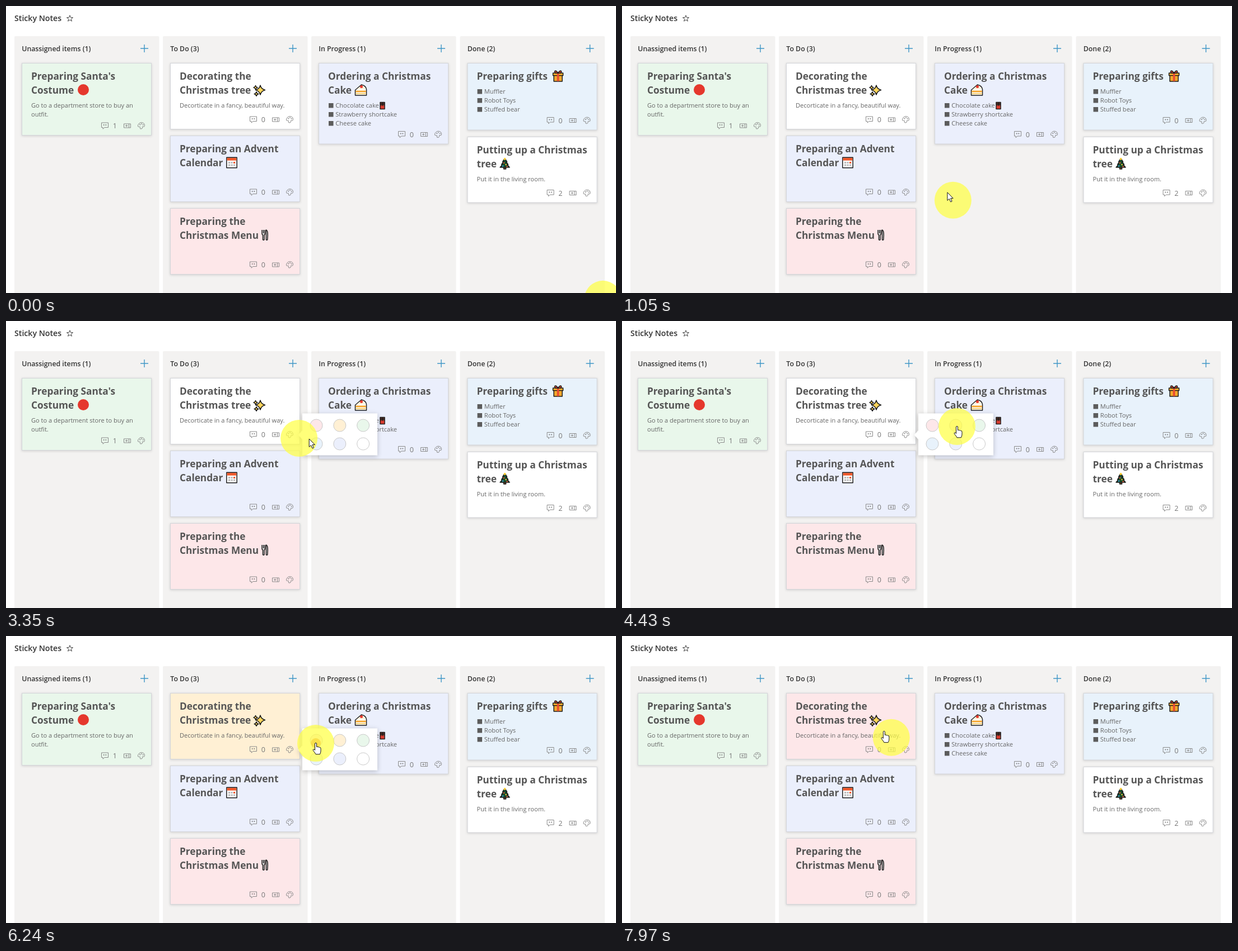
An HTML page for the animation above (8 s loop, 1089 px wide and 514 px high).

```html
<!DOCTYPE html>
<html lang="en">
<head>
<meta charset="utf-8">
<title>Sticky Notes</title>
<style>
  html, body { margin: 0; width: 100%; height: 100%; overflow: hidden; background: #fff; }
  svg { display: block; width: 100vw; height: 100vh; }
  text { font: 400 11.05px "Open Sans", "Noto Sans", sans-serif; fill: #666; white-space: pre; }
  .page { font-size: 14.2px; font-weight: 600; fill: #333; }
  .column { font-size: 12.3px; font-weight: 600; fill: #333; }
  .title { font-size: 17.25px; font-weight: 700; fill: #555; }
  .count { font-size: 12.5px; fill: #777; }
  .card { stroke: #d3d5d9; filter: drop-shadow(0 1.5px 2px rgba(0, 0, 0, .14)); }
  .icon { fill: none; stroke: #8a8a8a; }
  .plus { fill: none; stroke: #3f97c6; stroke-width: 1.4; }
  .emoji { stroke: #1d1d1d; stroke-width: 1.5; stroke-linejoin: round; }
  .flat { stroke: none; }
  .pointer { fill: #fff; stroke: #111; stroke-linejoin: round; }
  #popup { filter: drop-shadow(0 2px 4px rgba(0, 0, 0, .22)); }
</style>
</head>
<body>
<svg id="stage" viewBox="0 0 1089 514"></svg>
<script>
const COLORS = {
  pink: '#fde7e9', yellow: '#fff0d4', green: '#e9f7eb',
  blue: '#e8f2fb', lavender: '#ebeffc', white: '#ffffff'
};
const LOOP = 8000;
const CARD_WIDTH = 231;

const columns = [
  { x: 15, name: 'Unassigned items (1)', cards: [
    { y: 102.5, h: 129, color: 'green', title: ["Preparing Santa's", 'Costume'],
      body: ['Go to a department store to buy an', 'outfit.'], count: 1, emoji: ['santa', 138, 150] }
  ] },
  { x: 280, name: 'To Do (3)', cards: [
    { y: 102.5, h: 118, color: 'white', title: ['Decorating the', 'Christmas tree'],
      body: ['Decorticate in a fancy, beautiful way.'], count: 0, emoji: ['sparkles', 452, 151] },
    { y: 232.5, h: 118, color: 'lavender', title: ['Preparing an Advent', 'Calendar'],
      body: [], count: 0, emoji: ['calendar', 403, 280.5] },
    { y: 362.5, h: 118, color: 'pink', title: ['Preparing the', 'Christmas Menu'],
      body: [], count: 0, emoji: ['cutlery', 462, 410] }
  ] },
  { x: 545, name: 'In Progress (1)', cards: [
    { y: 102.5, h: 144.5, color: 'lavender', title: ['Ordering a Christmas', 'Cake'], list: true,
      body: ['Chocolate cake', 'Strawberry shortcake', 'Cheese cake'], count: 0, emoji: ['cake', 633.5, 150.5] }
  ] },
  { x: 810.5, name: 'Done (2)', cards: [
    { y: 102.5, h: 119.5, color: 'blue', title: ['Preparing gifts'], list: true,
      body: ['Muffler', 'Robot Toys', 'Stuffed bear'], count: 0, emoji: ['gift', 985.5, 125] },
    { y: 234.5, h: 117.5, color: 'white', title: ['Putting up a Christmas', 'tree'],
      body: ['Put it in the living room.'], count: 2, emoji: ['tree', 890.5, 282] }
  ] }
];

const swatches = Object.values(COLORS);
['pink', 'yellow', 'green', 'blue', 'lavender', 'white'].forEach((name, i) => swatches[i] = {
  x: 554 + i % 3 * 41.8, y: i < 3 ? 187 : 220, color: COLORS[name]
});

const text = (x, y, content, cls = '') => `<text x="${x}" y="${y}" class="${cls}">${content}</text>`;
const rect = (x, y, w, h, fill, cls = 'flat') =>
  `<rect x="${x}" y="${y}" width="${w}" height="${h}" fill="${fill}" class="${cls}"/>`;
const dot = (x, y, r, fill, cls = 'flat') => `<circle cx="${x}" cy="${y}" r="${r}" fill="${fill}" class="${cls}"/>`;
const path = (d, fill = 'none', cls = '') => `<path d="${d}" fill="${fill}" class="${cls}"/>`;
const at = (x, y, content, cls = '') => `<g transform="translate(${x} ${y})" class="${cls}">${content}</g>`;
const spark = (x, y, r) =>
  path(`M${x} ${y - r}Q${x + r * .2} ${y - r * .2} ${x + r} ${y}Q${x + r * .2} ${y + r * .2} ${x} ${y + r}` +
       `Q${x - r * .2} ${y + r * .2} ${x - r} ${y}Q${x - r * .2} ${y - r * .2} ${x} ${y - r}Z`, '#ffd45a');

const emoji = {
  santa: dot(0, 0, 10, '#e5382d'),
  sparkles: spark(2, -.5, 8.5) + spark(-6.5, -5, 3.5) + spark(-5, 6.5, 3.8),
  calendar: rect(-9.2, -9.2, 18.4, 18.4, '#fff', '') + rect(-8.4, -8.4, 16.8, 4.6, '#f0592b') +
    [0, 1, 2, 3, 4, 5].map(i => rect(-6 + i % 3 * 4.5, i < 3 ? -1.5 : 3, 3.2, 3, i == 2 ? '#f0592b' : '#bbb')).join(''),
  cutlery: path('M-5-9V-3Q-5 0-3.5 0V8.5Q-2.2 10-1 8.5V0Q.4 0 .4-3V-9M-2.3-9V-3', '#ddd') +
    path('M2.4-9Q5.5-8 5.3 1L4.8 8.5Q3.6 10 2.5 8.5Z', '#ddd'),
  cake: path('M-10 9.5V0L1-9.5Q9-8 10-1V9.5Z', '#fff') + rect(-9.2, 1, 18.4, 3, '#f6a62f') +
    rect(-9.2, 5.5, 18.4, 2, '#f8cf72') + path('M-8-1L1-8Q7-7 8.5-1Z', '#fff4dc', 'flat') + dot(1, -6, 2.5, '#e5382d'),
  chocolate: rect(-4, -6, 8, 12, '#6b3327', '') + rect(-3.3, 0, 6.6, 5.3, '#d83b30') +
    path('M0-6V0M-4-3H4', 'none'),
  gift: rect(-7.5, -1, 15, 11, '#f7a82b', '') + rect(-9, -5, 18, 4.6, '#ffb52e', '') +
    rect(-1.8, -4.4, 3.6, 14, '#e94a35') +
    path('M0-5Q-7-4-6-8Q-4-11 0-5Q4-11 6-8Q7-4 0-5Z', '#e94a35'),
  tree: rect(-2, 6, 4, 4, '#80502e', '') + path('M0-9L4-3H2.5L6 2H4.3L8.5 7H-8.5L-4.3 2H-6L-2.5-3H-4Z', '#174f2d') +
    dot(0, -8, 2, '#ffd033') + dot(-1.5, -1, 1.2, '#f05238') + dot(2, 2, 1.2, '#ffd033') +
    dot(-3.5, 4.5, 1.2, '#41a7df') + dot(4, 5.5, 1.2, '#f05238')
};

const commentIcon = path('M.5-5.5H12.5V3H6L3 5.7V3H.5Z') + dot(4.7, -1.5, 1, '#777') + dot(8.3, -1.5, 1, '#777');
const ticketIcon = path('M.5-3.5H12.5V3.5H.5ZM9.5-3.5V3.5M3 0H7.5M5.2-2V2');
const paletteIcon = path('M6 5.6Q3.5 6 4.5 3Q5 1 2.2 2Q-.3 2 .6-1.2Q2.5-5.8 7-5.8Q12.8-5.3 12.5 0Q12 2.5 10 1.6Q7.7 1 8.5 3.2Q8.8 5.2 6 5.6Z') +
  dot(4.2, -2, .9, '#777') + dot(7, -3.4, .9, '#777') + dot(9.8, -1.7, .9, '#777');

function drawCard(card, columnX) {
  const x = card.x = columnX + 13.5;
  const left = x + 16.5, iconY = card.y + card.h - 17;
  const bodyY = card.y + 29.5 + card.title.length * 25;
  return rect(x, card.y, CARD_WIDTH, card.h, COLORS[card.color], 'card') +
    card.title.map((line, i) => text(left, card.y + 29.5 + i * 25, line, 'title')).join('') +
    card.body.map((line, i) => {
      const y = bodyY + i * 16;
      return (card.list ? rect(left + 1, y - 8, 8.5, 8.5, '#5c5c5c') : '') +
        text(left + (card.list ? 13.3 : 0), y, line);
    }).join('') +
    at(x + 141.5, iconY, commentIcon, 'icon') +
    text(x + 162.2, iconY + 4.5, card.count, 'count') +
    at(x + 181.5, iconY, ticketIcon, 'icon') +
    at(x + 206.5, iconY, paletteIcon, 'icon') +
    at(card.emoji[1], card.emoji[2], emoji[card.emoji[0]], card.emoji[0] == 'santa' ? '' : 'emoji');
}

const star = Array.from({ length: 10 }, (_, i) => {
  const r = i % 2 ? 2.4 : 5.8, a = i * Math.PI / 5;
  return `${(114 + r * Math.sin(a)).toFixed(2)} ${(22.5 - r * Math.cos(a)).toFixed(2)}`;
}).join('L');

const stage = document.getElementById('stage');
stage.innerHTML =
  text(15, 27, 'Sticky Notes', 'page') +
  `<path d="M${star}Z" fill="none" stroke="#444"/>` +
  columns.map(col =>
    `<rect x="${col.x}" y="54" width="258.5" height="470" rx="2" fill="#f3f2f1"/>` +
    text(col.x + 13.3, 81, col.name, 'column') +
    path(`M${col.x + 225} 76H${col.x + 239}M${col.x + 232} 69V83`, 'none', 'plus') +
    col.cards.map(card => drawCard(card, col.x)).join('')
  ).join('') +
  at(672, 178.5, emoji.chocolate, 'emoji') +
  '<g id="popup">' +
    path('M529 165.5H663V240.5H529V212L521.5 204L529 196Z', '#fff') +
    swatches.map(s => `<circle cx="${s.x}" cy="${s.y}" r="11" fill="${s.color}" stroke="#c9c9c9"/>`).join('') +
  '</g>' +
  '<circle id="halo" r="33" fill="#ffff46" fill-opacity=".72"/>' +
  '<circle id="press" r="9" fill="#f0b400" fill-opacity=".35"/>' +
  '<g id="pointer" class="pointer">' +
    '<path id="arrow" d="M0 0V14.5L3.4 11.5L5.8 17L8.2 16L5.8 10.6H10.2Z"/>' +
    '<path id="hand" d="M-1.5 1A1.5 1.5 0 0 1 1.5 1V6.5Q3.3 5.5 4.2 7Q6 6.2 6.8 7.7Q9 7.3 9 9.5V14Q9 17 7.3 19.8H0Q-1 17.5-4.3 13.5Q-5.6 11.4-4.2 10.9Q-3 10.6-1.5 12.5Z"/>' +
  '</g>';

const el = id => document.getElementById(id);
const popup = el('popup'), halo = el('halo'), press = el('press');
const pointer = el('pointer'), arrow = el('arrow'), hand = el('hand');
const recolored = columns[1].cards[0];
const recoloredRect = stage.querySelectorAll('.card')[1];

// Pointer route: time, x, y. The halo trails along the same route.
const route = [
  [-70, 1066, 525], [0, 1030, 516], [760, 620, 371], [980, 591, 348], [1050, 581, 334],
  [1610, 526, 243], [2030, 510, 211], [2310, 507, 205], [3080, 507, 205], [3280, 523, 210],
  [3350, 541, 211], [3840, 598, 189], [4520, 598, 189], [4850, 607, 235], [5070, 597, 257],
  [5210, 583, 250], [5280, 575.5, 247], [5840, 553, 192], [6650, 553, 192], [6930, 573, 230],
  [7000, 579, 242], [7360, 603, 287], [7430, 603, 287], [7900, 481, 182], [7970, 468, 171], [8000, 463, 167]
];
const LAG = 70;

// Monotone cubic interpolation: smooth, and never past a resting point.
const slope = (i, k) => (route[i + 1][k] - route[i][k]) / (route[i + 1][0] - route[i][0]);
function tangent(i, k) {
  if (i == 0) return slope(0, k);
  if (i == route.length - 1) return slope(i - 1, k);
  const a = slope(i - 1, k), b = slope(i, k);
  return a * b > 0 ? 2 * a * b / (a + b) : 0;
}
function position(t) {
  let i = 0;
  while (i < route.length - 2 && t >= route[i + 1][0]) i++;
  const d = route[i + 1][0] - route[i][0], u = (t - route[i][0]) / d, v = 1 - u;
  return [1, 2].map(k =>
    route[i][k] * v * v * (1 + 2 * u) + route[i + 1][k] * u * u * (3 - 2 * u) +
    d * u * v * (tangent(i, k) * v - tangent(i + 1, k) * u));
}

function overClickable(x, y, popupOpen) {
  if (popupOpen && x > 529 && x < 663 && y > 165 && y < 245)
    return swatches.some(s => Math.hypot(x - s.x, y - s.y) < 11);
  return columns.some(col => col.cards.some(c =>
    x > c.x && x < c.x + CARD_WIDTH && y > c.y && y < c.y + c.h));
}

const between = (t, from, to) => t >= from && t < to;
const show = (node, visible) => node.setAttribute('visibility', visible ? 'visible' : 'hidden');
const move = (node, [x, y]) => node.setAttribute('transform', `translate(${x.toFixed(2)} ${y.toFixed(2)})`);

function render(t) {
  const open = between(t, 2700, 7410);
  const appear = Math.min(1, Math.max(0, (t - 2700) / 200));
  show(popup, open);
  popup.setAttribute('opacity', appear);
  move(popup, [-8 * (1 - appear) ** 2, 0]);

  recolored.color = t < 4570 ? 'white' : t < 6720 ? 'yellow' : 'pink';
  recoloredRect.setAttribute('fill', COLORS[recolored.color]);

  const tip = position(t), trail = position(t - LAG);
  move(pointer, tip);
  move(halo, trail);
  move(press, trail);
  show(press, between(t, 2580, 2650) || between(t, 4300, 4430) || between(t, 6240, 6310));
  const clickable = overClickable(...tip, open);
  show(hand, clickable);
  show(arrow, !clickable);
}

function frame() {
  render(performance.now() % LOOP);
  requestAnimationFrame(frame);
}
frame();
</script>
</body>
</html>
```
